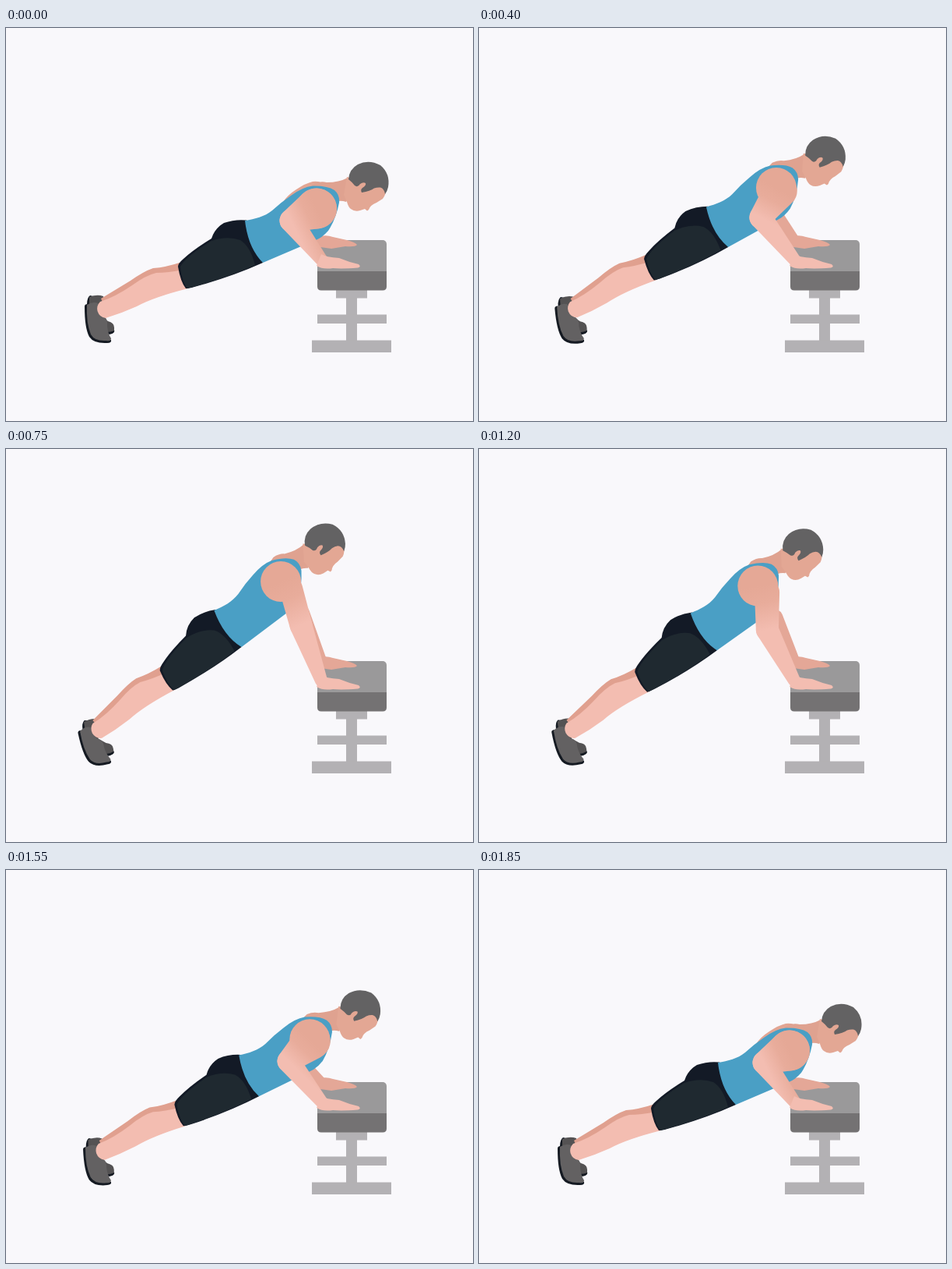
Animation of 600x504 px, one loop 2.1 s. Source, as an HTML page:

```html
<!DOCTYPE html>
<html lang="en">
<head>
<meta charset="utf-8">
<title>Incline push-up</title>
<style>
html, body { margin: 0; width: 100%; height: 100%; overflow: hidden; background: #f9f8fb; }
svg { display: block; width: 100vw; height: 100vh; }
</style>
</head>
<body>
<svg viewBox="0 0 600 504">
  <defs>
    <linearGradient id="armSkin" gradientUnits="userSpaceOnUse">
      <stop offset="0" stop-color="#e5a896"/>
      <stop offset=".4" stop-color="#e8ac9b"/>
      <stop offset="1" stop-color="#f3bdb1"/>
    </linearGradient>
  </defs>

  <g fill="#b3b1b4">
    <rect x="437" y="337" width="14" height="66"/>
    <rect x="400" y="367.500" width="89" height="11.500"/>
    <rect x="393" y="400.500" width="102" height="15.500"/>
    <rect x="424" y="336" width="40" height="10.500"/>
  </g>
  <rect x="400" y="272" width="89" height="55" rx="5" fill="#9a999a"/>
  <path d="M400 312h89v19.500q0 5-5 5h-79q-5 0-5-5z" fill="#747273"/>

  <path id="farElbow" fill="#e2a593" d="M356 223Q362 214 373 207Q385 199 394 197Q406 196 408 202L398 216L362 226Z"/>
  <g fill="#e4a797">
    <path id="farArm"/>
    <path d="M404 267Q412 265 420 268L438 272Q449 275 451 278Q449 281 436 280L418 283L404 281Z"/>
  </g>

  <g id="farShoe">
    <path fill="#151a22" d="M104 354Q104 346 108 343L112 344V365Z"/>
    <path fill="#545253" d="M107 345Q117 341 125 344L127 352L122 369L131 376Q139 378 139 384L139 390Q137 393 130 391L107 362Z"/>
    <path fill="#151a22" d="M129 390Q135 390 139.500 388Q139 393 130 393Z"/>
  </g>

  <g class="body">
    <path fill="#e0a08f" d="M226 300Q205 307 189 308Q177 312 160 324L122 347L128 360L230 325Z"/>
  </g>

  <g id="nearShoe">
    <path fill="#151a22" d="M101 357Q101 354 105 354L112 380L124 399L135 400Q136 404 130 404Q113 405 107 396Q101 385 101 357Z"/>
    <path fill="#636162" d="M104 355Q112 350 118 353Q118 367 127 371Q131 374 130 382Q131 392 135 398Q135 402 129 401Q114 402 109 393Q103 379 104 355Z"/>
  </g>

  <g class="body">
    <path fill="#f3bdb1" d="M228 310Q208 314 193 314Q180 317 162 330Q140 345 121 351Q116 356 117.500 363Q120 371 128 372Q148 366 168 357Q190 345 234 334Z"/>
    <path fill="#131a26" d="M309 246.500Q294 245 280 250Q268 257 264 270Q241 284 228 296Q221 302 221 306Q224 325 231 334Q235 334 242 332Q290 319 330 301L324 268Z"/>
    <path fill="#1f2930" d="M224 306Q230 294 264 273Q284 266 301 272Q314 280 320 304Q285 320 233 334Q226 325 224 306Z"/>
    <path fill="#dfa290" d="M388 207L397 199Q405 196 412 198Q428 198 439 192L455 190L437 223Q431 221 427 222L410 220Z"/>
    <path fill="#4a9fc5" d="M307 247C320 245 332 242 342 234Q354 223 366 215Q381 204 394 202.500Q413 202 422 208Q429 214 428 224Q424 245 414 260Q406 269 398 272L330 301Q311 282 307 247Z"/>
    <path fill="#e3a794" d="M438 191L489 205Q488 214 484 219L476 224Q468 227 466 233L464 234.500L461 232L455 234Q448 236 443 232Q440 230 438 223L434 214Z"/>
    <path fill="#636263" d="M440 194Q441 181 452 175Q466 168 481 176Q494 187 491 204Q490 209 487 213Q486 206 481 204.500Q477 204 473 205.500Q468 209 457 211Q455 207 458 205Q463 202 462 199Q459 197 455 200Q452 205 448 202Q445 198 440 194Z"/>
  </g>

  <g fill="url(#armSkin)">
    <circle id="shoulder" r="26"/>
    <path id="upperArm"/>
    <path id="forearm"/>
  </g>
  <path fill="#f3bdb1" d="M405 290Q411 294 428 295Q440 300 453 303Q457 306 452 307.500Q431 309 420 308Q407 310 399 305Z"/>
</svg>

<script>
const LOOP = 2100, STEP = 50, MOVE = 550, RISE = 200, SINK = 1150;
const TILT = 13.72, TOE = [120.5, 391.5];

const byId = id => document.getElementById(id);
const set = (el, attrs) => Object.entries(attrs).forEach(([k, v]) => el.setAttribute(k, v));
const mix = (a, b, k) => a.map((v, i) => v + (b[i] - v) * k);
const bezier = (a, b, c, k) => mix(mix(a, b, k), mix(b, c, k), k);

function ease(ms) {
  const f = Math.min(1, Math.max(0, ms / MOVE));
  return f + f ** 1.5 * (1 - f) / 3;
}

function turn([x, y], [cx, cy], degrees) {
  const a = degrees * Math.PI / 180, c = Math.cos(a), s = Math.sin(a);
  return [cx + (x - cx) * c - (y - cy) * s, cy + (x - cx) * s + (y - cy) * c];
}

// Tapered capsule around two circles, the first one the larger
function limb(a, ra, b, rb) {
  const dx = b[0] - a[0], dy = b[1] - a[1];
  const dir = Math.atan2(dy, dx), spread = Math.acos((ra - rb) / Math.hypot(dx, dy));
  const edge = ([x, y], r, side) =>
    [x + r * Math.cos(dir + side * spread), y + r * Math.sin(dir + side * spread)];
  return `M${edge(a, ra, 1)}A${ra} ${ra} 0 1 1 ${edge(a, ra, -1)}` +
         `L${edge(b, rb, -1)}A${rb} ${rb} 0 0 1 ${edge(b, rb, 1)}Z`;
}

function drawArms(h) {
  const shoulder = turn([399, 231.5], TOE, -TILT * h);
  const top = [shoulder[0] + 13 * h, shoulder[1] + 9 * h];
  // The elbow bends fastest just after the arm leaves its straight pose
  const elbow = bezier([379, 226], [353.5, 242], [366, 247], (1 - h) ** 0.7);
  set(byId('shoulder'), { cx: shoulder[0], cy: shoulder[1] });
  set(byId('upperArm'), { d: limb(top, 26 - 11 * h, elbow, 14.5) });
  set(byId('forearm'), { d: limb(elbow, 14.5, [405, 297], 8) });
  set(byId('armSkin'), { x1: shoulder[0], y1: shoulder[1], x2: elbow[0], y2: elbow[1] });
  set(byId('farArm'), { d: limb(mix([384, 264], [381, 210], h), 9, [406, 274], 7) });
  set(byId('farElbow'), { transform: `translate(${-60 * h} 0)` });
}

function draw(time) {
  const t = Math.floor(time % LOOP / STEP) * STEP;
  const h = ease(t - RISE) - ease(t - SINK);
  const rotate = (el, angle, [x, y]) => set(el, { transform: `rotate(${angle} ${x} ${y})` });
  document.querySelectorAll('.body').forEach(el => rotate(el, -TILT * h, TOE));
  rotate(byId('nearShoe'), -12 * h, [132, 401]);
  rotate(byId('farShoe'), -9 * h, [136, 392]);
  drawArms(h);
}

const start = performance.now();
function tick() {
  draw(performance.now() - start);
  requestAnimationFrame(tick);
}
tick();
</script>
</body>
</html>
```
